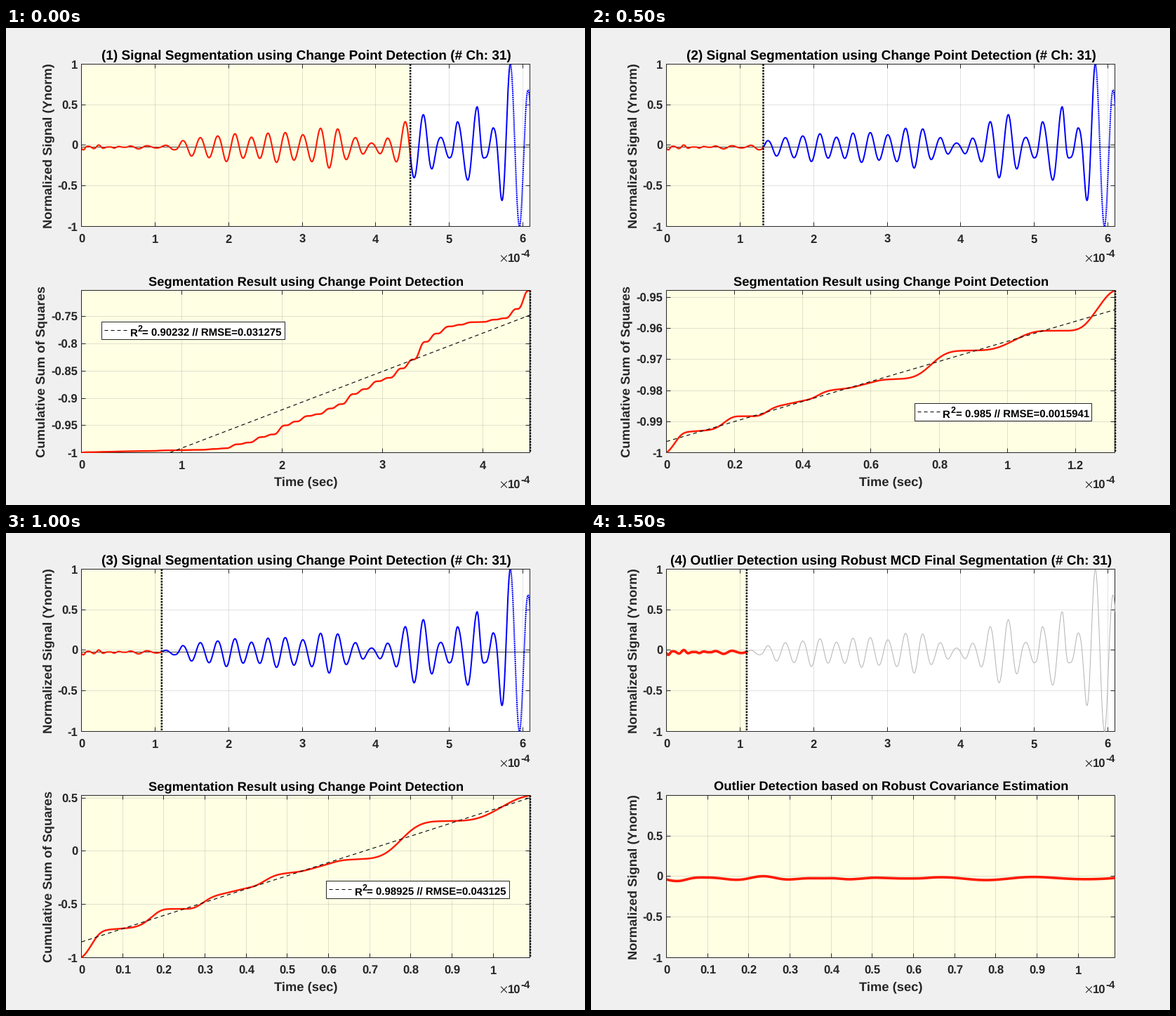
A matplotlib script for the animation above (2 s loop, 825x679 px).

```python
import numpy as np
import matplotlib.pyplot as plt
from matplotlib.animation import FuncAnimation
from matplotlib.patches import Rectangle

plt.rcParams.update({
    "font.family": "Liberation Sans",
    "font.weight": "bold",
    "text.hinting": "none",
    "path.snap": False,
})

W, H, DPI = 825, 679, 100
PT = 72 / DPI
LEFT, RIGHT = 107, 746
TOP1, BOT1 = 51, 282
TOP2, BOT2 = 373, 604
SPAN = 231                # height of each panel
WIDTH = 639.7             # width of the plotted data
T_END = 6.1               # time is in units of 1e-4 s
DARK, RED, BLUE = "#262626", "#ff1a00", "#0000ff"
CREAM, BACK = "#ffffe4", "#f0f0f0"
REST = -.022

# Half-cycle count over time: a nearly steady rhythm
BEAT_T = [-.045, .0256, .235, .653, .898, 1.378, 2.088, 2.532, 3.723, 4.27,
          4.77, 5.11, 5.377, 5.703, 6.2]
BEAT_K = [0, 1, 4, 10, 12, 16, 22, 26, 36, 41, 45, 48, 50, 53, 57]

# Envelope: half-cycle count, amplitude
SWELL = np.array([
    (1, .034), (2, .01), (4, .026), (6, 0), (7, .012), (9, .002), (11, .022),
    (13, .011), (15, .033), (16, .08), (17, .11), (20, .137), (21, .178),
    (24, .122), (27, .188), (30, .152), (33, .258), (36, .117), (38, .05),
    (40, .11), (43, .378), (44, .4), (46, .12), (47, .133), (48, .312),
    (50, .497), (51, .13), (52, .237), (54, 1.022), (55, .978), (57, .4)])


def envelope(k):
    ks, amps = SWELL.T
    i = np.clip(np.searchsorted(ks, k) - 1, 0, len(ks) - 2)
    u = np.clip((k - ks[i]) / (ks[i + 1] - ks[i]), 0, 1)
    return amps[i] + (amps[i + 1] - amps[i]) * (1 - np.cos(np.pi * u)) / 2


def signal(t):
    k = np.interp(t, BEAT_T, BEAT_K)
    return REST + envelope(k) * np.cos(np.pi * k)


def energy(split):
    """Cumulative sum of squares up to split, scaled to the lower panel."""
    t = np.linspace(0, split, 2000)
    total = np.cumsum(signal(t) ** 2)
    return LEFT + WIDTH * t / split, BOT2 - SPAN * total / total[-1]


def steps(first, gap, labels):
    return [(round(first + i * gap), s) for i, s in enumerate(labels.split())]


TENTHS = steps(LEFT, 58.65, "0 0.1 0.2 0.3 0.4 0.5 0.6 0.7 0.8 0.9 1")
UNIT = "-1 -0.5 0 0.5 1"
CHANGE = "Signal Segmentation using Change Point Detection"
RESULT = "Segmentation Result using Change Point Detection"
CUMSUM, YNORM = "Cumulative Sum of Squares", "Normalized Signal (Ynorm)"

SCENES = [
    dict(title="(1) " + CHANGE, split=4.469, sub=RESULT, ylabel=CUMSUM, ybase=55,
         xt=steps(LEFT, 143.1, "0 1 2 3 4"),
         yt=steps(BOT2, -38.7, "-1 -0.95 -0.9 -0.85 -0.8 -0.75"),
         legend=(136, 418, 261, "= 0.90232 // RMSE=0.031275")),
    dict(title="(2) " + CHANGE, split=1.316, sub=RESULT, ylabel=CUMSUM, ybase=55,
         xt=steps(LEFT, 97.15, "0 0.2 0.4 0.6 0.8 1 1.2"),
         yt=steps(BOT2, -44.2, "-1 -0.99 -0.98 -0.97 -0.96 -0.95"),
         legend=(461, 534, 252, "= 0.985 // RMSE=0.0015941")),
    dict(title="(3) " + CHANGE, split=1.09, sub=RESULT, ylabel=CUMSUM, ybase=64.4,
         xt=TENTHS, yt=steps(BOT2, -75.8, "-1 -0.5 0 0.5"),
         legend=(456, 495, 261, "= 0.98925 // RMSE=0.043125")),
    dict(title="(4) Outlier Detection using Robust MCD Final Segmentation",
         split=1.09, sub="Outlier Detection based on Robust Covariance Estimation",
         ylabel=YNORM, ybase=64.4, xt=TENTHS, yt=steps(BOT2, -SPAN / 4, UNIT)),
]

fig = plt.figure(figsize=(W / DPI, H / DPI), dpi=DPI, facecolor=BACK)
ax = fig.add_axes([0, 0, 1, 1])


def text(x, y, s, size, ha="center", color=DARK, **kw):
    ax.text(x, y + .2, s, size=size, ha=ha, va="baseline", color=color,
            zorder=9, **kw)


def line(xs, ys, color, px, clip=None, z=4, **kw):
    p, = ax.plot(xs, ys, color=color, lw=px * PT, zorder=z, **kw)
    if clip is not None:
        p.set_clip_path(clip)


def rect(x0, y0, x1, y1, face, edge="none", z=1):
    r = Rectangle((x0, y0), x1 - x0, y1 - y0, fc=face, ec=edge, lw=PT, zorder=z)
    return ax.add_patch(r)


def dotted(x, top, bottom):
    line([x, x], [top, bottom], "black", 2.5, z=6, ls=(0, (1, .65)),
         dash_capstyle="butt")


def panel(top, bottom, xt, yt, ylabel, ybase):
    """Grid, box, ticks and their labels."""
    def tick(xs, ys):
        line(xs, ys, DARK, 1, z=3, solid_capstyle="butt")

    for x, s in xt:
        line([x, x], [top, bottom], DARK, 1, z=2, alpha=.13)
        tick([x, x], [bottom, bottom - 6])
        tick([x, x], [top, top + 6])
        text(x, bottom + 23, s, 12)
    for y, s in yt:
        line([LEFT, RIGHT], [y, y], DARK, 1, z=2, alpha=.13)
        tick([LEFT, LEFT + 6], [y, y])
        tick([RIGHT, RIGHT - 6], [y, y])
        text(102, y + 6, s, 12, ha="right")
    rect(LEFT, top, RIGHT, bottom, "none", DARK, z=3)
    text(ybase, (top + bottom) / 2, ylabel, 13.25, rotation=90,
         rotation_mode="anchor")
    mid = bottom + 45.5
    for d in (-4, 4):
        line([705, 713], [mid - d, mid + d], DARK, 1.1)
    text(714, bottom + 51, "10", 12, ha="left")
    text(733, bottom + 43, "-4", 10.8, ha="left")


def legend(x, y, w, s):
    rect(x, y, x + w, y + 25, "white", DARK, z=7)
    line([x + 4, x + 36], [y + 12] * 2, "black", 1, z=8, ls=(0, (5, 4)))
    text(x + 40, y + 20, "R", 10.8, ha="left", color="black")
    text(x + 51, y + 13, "2", 9, ha="left", color="black")
    text(x + 58, y + 20, s, 10.8, ha="left", color="black")


def wave(t0, t1, color, px, clip, top=TOP1, end=T_END, **kw):
    t = np.linspace(t0, t1, 2000)
    y = top + SPAN / 2 * (1 - signal(t))
    line(LEFT + WIDTH * t / end, y, color, px, clip, **kw)


def draw(i):
    ax.clear()
    ax.set(xlim=(-.5, W - .5), ylim=(H - .5, -.5))
    ax.axis("off")
    scene = SCENES[i]
    split, final = scene["split"], "legend" not in scene
    edge = LEFT + WIDTH * split / T_END

    # upper panel
    clip = rect(LEFT, TOP1, RIGHT + .5, BOT1, "white")
    rect(LEFT, TOP1, edge, BOT1, CREAM)
    panel(TOP1, BOT1, steps(LEFT, WIDTH / T_END, "0 1 2 3 4 5 6"),
          steps(BOT1, -SPAN / 4, UNIT), YNORM, 64.4)
    text(427, 44, scene["title"] + " (# Ch: 31)", 13.7, color="black")
    if final:
        wave(split, T_END, "#b3b3b3", 1, clip)
        wave(0, split, RED, 3.6, clip)
    else:
        line([LEFT, RIGHT], [169, 169], "#404040", 1, z=3)
        wave(split, 5.832, BLUE, 2, clip)
        wave(5.83, T_END, BLUE, 2, clip, ls=(0, (1, .45)))
        wave(0, split, RED, 2.1, clip)
    dotted(edge, TOP1, BOT1)

    # lower panel
    clip = rect(LEFT, TOP2, RIGHT + .5, BOT2, CREAM)
    panel(TOP2, BOT2, scene["xt"], scene["yt"], scene["ylabel"], scene["ybase"])
    text(427, 365, scene["sub"], 13.25, color="black")
    text(426.5, 651, "Time (sec)", 13.25)
    if final:
        wave(0, split, RED, 3.6, clip, top=TOP2, end=split)
    else:
        x, y = energy(split)
        line(x, y, RED, 2.4, clip)
        fit = np.polyval(np.polyfit(x, y, 1), x)
        inside = (fit >= TOP2) & (fit <= BOT2)
        line(x[inside], fit[inside], "black", 1.1, z=5, ls=(0, (5, 4)))
        dotted(RIGHT + .5, TOP2, BOT2)
        legend(*scene["legend"])
    return []


anim = FuncAnimation(fig, draw, frames=len(SCENES), interval=500,
                     init_func=lambda: [], repeat=True, repeat_delay=0)
plt.show()
```
